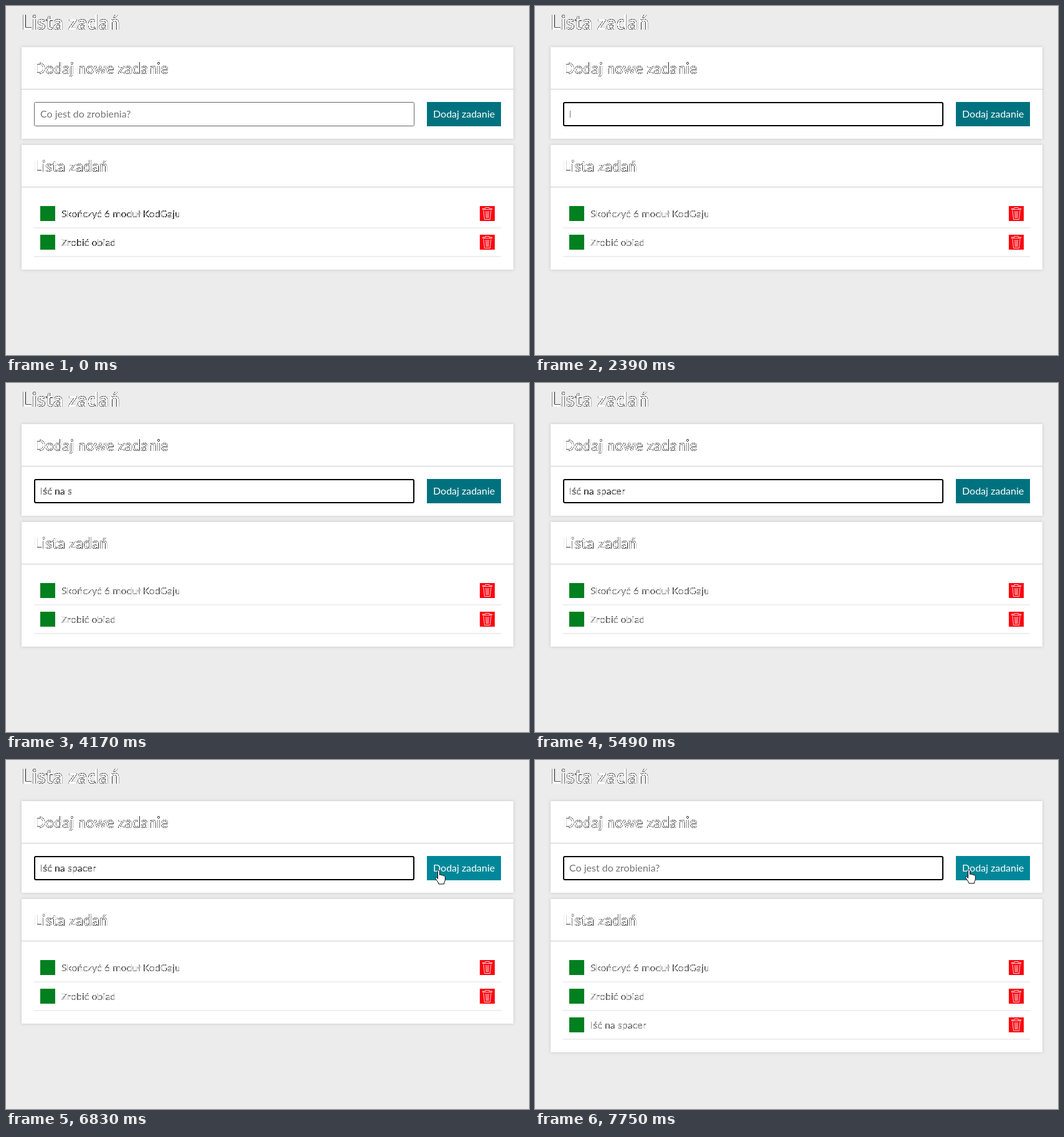
These frames come from a looping animation (840 by 560 pixels, 8000 ms). An HTML page:

```html
<!DOCTYPE html>
<html lang="pl">
<head>
<meta charset="utf-8">
<title>Lista zadań</title>
<style>
  html, body { margin: 0; height: 100%; overflow: hidden; background: #ececec; }
  svg { display: block; font: 16px Lato, sans-serif; }
  h1, .h1 { font: bold 32px Lato, sans-serif; }
  .h2 { font: bold 24px Lato, sans-serif; }
  .hollow { filter: url(#hollow); }
  .card { fill: #fff; filter: drop-shadow(0 0 2.5px #c4c4c4); }
  .rule { fill: #ccc; }
  .cursor { fill: #fff; stroke: #000; stroke-linejoin: round; }
</style>
</head>
<body>
<svg width="840" height="560" viewBox="0 0 840 560">
  <defs>
    <!-- Keeps the soft edges of the letters and turns their solid cores white. -->
    <filter id="hollow" color-interpolation-filters="sRGB">
      <feComponentTransfer result="edge">
        <feFuncA type="table" tableValues="0 .1 .2 .3 .4 .5 .6 .7 .8 .9 0"/>
      </feComponentTransfer>
      <feComponentTransfer in="SourceGraphic" result="core">
        <feFuncR type="discrete" tableValues="1"/>
        <feFuncG type="discrete" tableValues="1"/>
        <feFuncB type="discrete" tableValues="1"/>
        <feFuncA type="table" tableValues="0 0 0 0 0 0 0 0 0 0 1"/>
      </feComponentTransfer>
      <feMerge><feMergeNode in="core"/><feMergeNode in="edge"/></feMerge>
    </filter>
    <g id="row">
      <path d="M55 321h24v24h-24z" fill="#00801f"/>
      <path d="M761 321h24v24h-24z" fill="#fb0510"/>
      <path d="M765.5 326.5h15v-1.5h-4.5v-1.5h-6v1.5h-4.5zM767 328l1.5 14.5h9L779 328M770.7 329l.6 11.5M773 329v11.5M775.3 329l-.6 11.5"
        fill="none" stroke="#ffd5d5"/>
      <path d="M45 355h750v2h-750z" fill="#eee"/>
    </g>
  </defs>

  <text class="h1 hollow" x="25" y="37.5">Lista zadań</text>

  <rect class="card" x="25" y="66" width="790" height="147"/>
  <text class="h2 hollow" x="45" y="109">Dodaj nowe zadanie</text>
  <rect class="rule" x="25" y="133" width="790" height="1"/>
  <rect id="field" rx="2" fill="#fff"/>
  <text id="hint" x="55" y="179" fill="#757575">Co jest do zrobienia?</text>
  <text id="typed" class="hollow" x="55" y="179"></text>
  <rect id="caret" y="171" width="1" height="6" fill="#fff"/>
  <rect id="button" x="676" y="154" width="119" height="39"/>
  <text x="686" y="179" fill="#fff">Dodaj zadanie</text>

  <rect id="list" class="card" x="25" y="223" width="790"/>
  <text class="h2 hollow" x="45" y="266">Lista zadań</text>
  <rect class="rule" x="25" y="290" width="790" height="1"/>
  <use href="#row"/>
  <use href="#row" y="46"/>
  <use href="#row" y="92" id="newRow"/>
  <g id="labels">
    <text class="hollow" x="89" y="339">Skończyć 6 moduł KodGaju</text>
    <text class="hollow" x="89" y="385">Zrobić obiad</text>
    <text class="hollow" x="89" y="431" id="newLabel">Iść na spacer</text>
  </g>

  <g id="mouse">
    <path id="arrow" class="cursor" d="M.5-.5v16l3.7-3.5 2.6 6 2.4-1-2.6-5.9h5.2z"/>
    <path id="beam" fill="none" stroke="#000" d="M-3-7.5h2.5l.5.5.5-.5h2.5M0-7v14.5M-3 8h2.5l.5-.5.5.5h2.5"/>
    <path id="hand" class="cursor" d="M-1.5 1.5c0-2 3-2 3 0v6c1-1 3-.6 3 .6 1-.8 2.8-.4 3 .8 1.200-.6 2.800 0 2.800 1.600v5c0 2-1.800 3.500-1.800 6.500h-8.500c-.5-3-3-5-5-8.500-1.200-2.200.8-3.200 2.200-1.600l1.300 1.600z"/>
    <circle id="press" r="12" fill="#fbe92a" fill-opacity=".58"/>
  </g>
</svg>
<script>
const LOOP = 8000, STEP = 66.7;
const FOCUS = 1330, TYPING = 2390, MOVE_AGAIN = 5690, CLICK = 7090, ADDED = 7220;
const PRESS_TIME = 130;

// [time, text in the field]
const typing = [
  [2390, "I"], [2780, "Iś"], [2850, "Iść"], [3710, "Iść "], [3840, "Iść n"],
  [3910, "Iść na"], [4170, "Iść na s"], [4370, "Iść na sp"], [4440, "Iść na spa"],
  [4640, "Iść na spac"], [4830, "Iść na space"], [4970, "Iść na spacer"], [ADDED, ""]
];
// [time, x, y]
const path = [
  [860, 270, 300], [1130, 108, 183], [5620, 108, 183], [6300, 645, 206],
  [6360, 648, 206], [6500, 648, 206], [6890, 697, 176]
];
// Spans in which the caret is lit
const caretOn = [[FOCUS, 1850], [2390, 3110], [3710, 5490], [ADDED, 7750]];

const $ = id => document.getElementById(id);
const set = (id, attrs) => {
  for (const name in attrs) $(id).setAttribute(name, attrs[name]);
};
const show = (id, on) => set(id, { visibility: on ? "inherit" : "hidden" });
const within = (t, [from, to]) => t >= from && t < to;

function mouseAt(time) {
  const t = Math.floor((time + 7) / STEP) * STEP;
  if (t <= path[0][0]) return path[0].slice(1);
  const i = path.findIndex(key => key[0] > t);
  if (i < 0) return path.at(-1).slice(1);
  const [t0, x0, y0] = path[i - 1], [t1, x1, y1] = path[i];
  const p = (t - t0) / (t1 - t0), ease = p * (2 - p);
  return [x0 + (x1 - x0) * ease, y0 + (y1 - y0) * ease];
}

function draw(t) {
  const added = t >= ADDED;
  const focused = within(t, [FOCUS, CLICK]) || added;
  const pressed = within(t, [CLICK, CLICK + PRESS_TIME]);

  const text = typing.findLast(([at]) => t >= at)?.[1] ?? "";
  $("typed").textContent = text;
  show("hint", !text);
  const border = focused ? 2 : 1;
  set("field", {
    x: 45 + border / 2, y: 154 + border / 2,
    width: 611 - border, height: 39 - border,
    "stroke-width": border, stroke: focused ? "#000" : "#666"
  });
  set("caret", { x: 55 + Math.round($("typed").getComputedTextLength()) });
  show("caret", caretOn.some(span => within(t, span)));

  const [x, y] = mouseAt(t).map(Math.round);
  const moving = t >= MOVE_AGAIN;
  const overButton = moving && x >= 676;
  const overField = x >= 45 && x < 656 && y >= 154 && y < 193;
  set("mouse", { transform: `translate(${x} ${y})` });
  show("mouse", within(t, [860, TYPING]) || moving);
  show("arrow", !overButton && !overField);
  show("beam", overField);
  show("hand", overButton);
  show("press", pressed || within(t, [FOCUS, FOCUS + PRESS_TIME]));
  set("press", { cx: overButton ? -1 : -2, cy: -1 });
  set("button", { fill: pressed ? "#009fb3" : overButton ? "#008799" : "#00727f" });

  set("list", { height: added ? 246 : 200 });
  show("newRow", added);
  show("newLabel", added);
  set("labels", { opacity: t < 860 || pressed ? 1 : 0.78 });
}

function tick() {
  draw(performance.now() % LOOP);
  requestAnimationFrame(tick);
}
tick();
</script>
</body>
</html>
```
